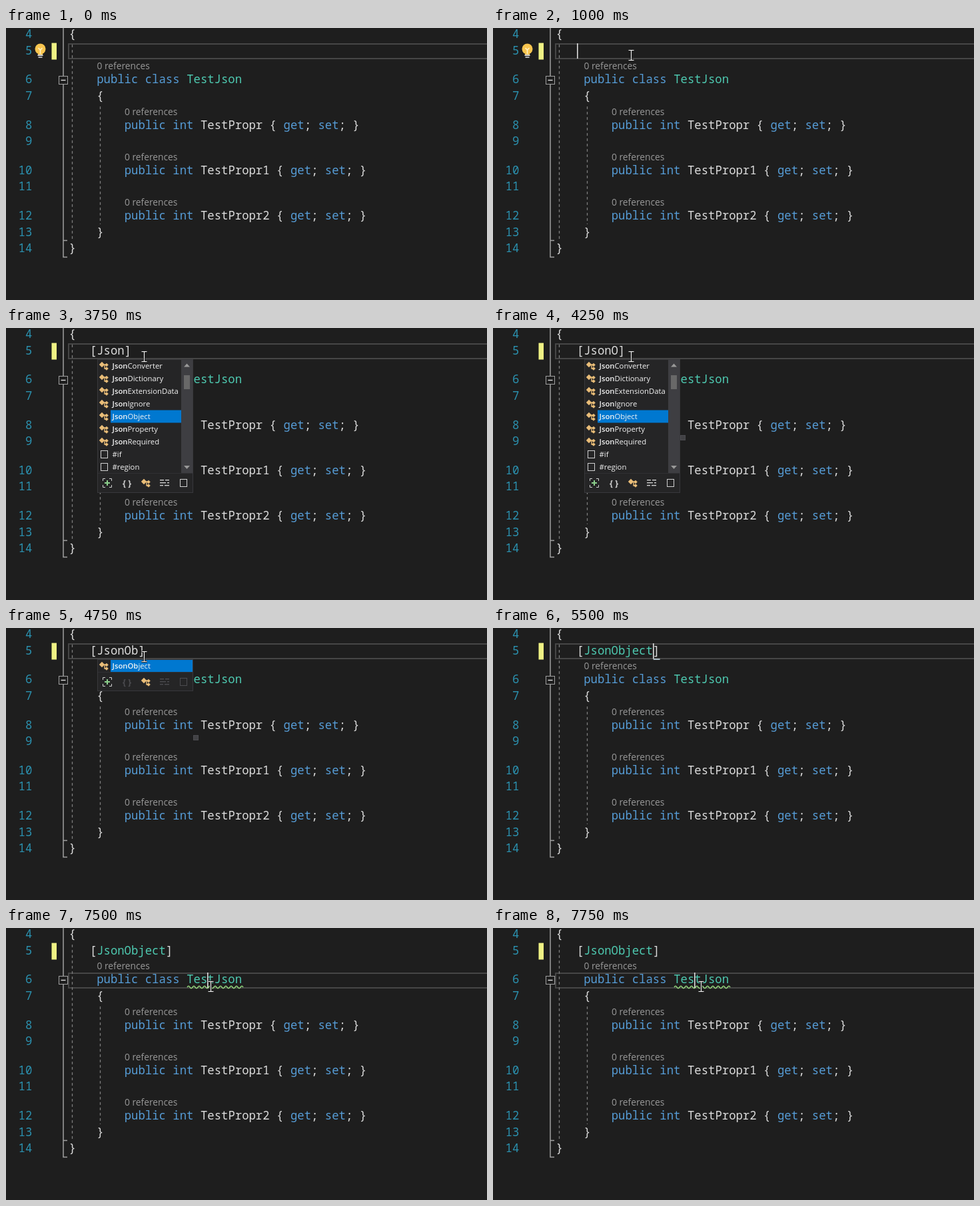
Animation, 722 px wide and 409 px high, one loop 8 s. Source, as an HTML page with a canvas:

```html
<!DOCTYPE html>
<html lang="en">
<head>
<meta charset="utf-8">
<title>Code editor</title>
<style>
  html, body { margin: 0; width: 100%; height: 100%; overflow: hidden; background: #1e1e1e; }
  canvas { display: block; }
</style>
</head>
<body>
<canvas id="stage" width="722" height="409"></canvas>
<script>
const ctx = document.getElementById('stage').getContext('2d');
const LOOP = 8000, STEP = 250, CHAR = 10.385, LEFT = 94.6;
const CODE = '500 17.3px "Noto Sans Mono", monospace';
const HINT = '13.8px "Open Sans", sans-serif';
const C = {
  bg: '#1e1e1e', plain: '#dcdcdc', keyword: '#569cd6', type: '#4ec9b0', number: '#2b91af',
  hint: '#999999', popup: '#252526', select: '#0078d0', icon: '#e9bd78', outline: '#a0a0a0'
};
const BASELINES = { 4: 15, 5: 40, 6: 83, 7: 108, 8: 152, 9: 176, 10: 220, 11: 244, 12: 288, 13: 313, 14: 337 };
const ITEMS = ['JsonConverter', 'JsonDictionary', 'JsonExtensionData', 'JsonIgnore', 'JsonObject',
  'JsonProperty', 'JsonRequired', '#if', '#region'];

// Each entry changes part of the editor state from its time on.
const EVENTS = [
  [0, { text: null, bulb: true, caret: null, mouse: null, line: 5, popup: null }],
  [250, { caret: 127, mouse: [268, 136] }],
  [500, { mouse: [240, 88] }],
  [750, { caret: null, mouse: [213, 48] }],
  [1000, { caret: 127, mouse: [207, 41] }],
  [1250, { mouse: [207, 43] }],
  [1500, { caret: null }],
  [2000, { text: '', bulb: false, caret: 137, match: true }],
  [2250, { caret: null }],
  [2500, { text: 'J', caret: 148 }],
  [2750, { text: 'Js', caret: 158 }],
  [3000, { text: 'Json', caret: 179 }],
  [3250, { caret: null, match: false }],
  [3750, { popup: 'full' }],
  [4000, { text: 'JsonO' }],
  [4250, { tip: true }],
  [4750, { text: 'JsonOb', popup: 'short' }],
  [5000, { text: 'JsonObje', mouse: null }],
  [5250, { text: 'JsonObject', popup: null, tip: false, caret: 241, match: true }],
  [5500, { resolved: true }],
  [5750, { caret: null, squiggle: true }],
  [6250, { mouse: [238, 58] }],
  [6500, { mouse: [290, 84] }],
  [6750, { mouse: [302, 88] }],
  [7250, { line: 6, match: false, caret: 303 }],
  [7500, { mouse: [307, 88] }],
  [7750, { mouse: [312, 88] }]
];

const stateAt = time => Object.assign({}, ...EVENTS.filter(e => e[0] <= time).map(e => e[1]));

function rect(x, y, w, h, color) {
  ctx.fillStyle = color;
  ctx.fillRect(x, y, w, h);
}

function path(points, color, width = 1, fill = false) {
  ctx.beginPath();
  points.forEach(([x, y]) => ctx.lineTo(x, y));
  if (fill) {
    ctx.closePath();
    ctx.fillStyle = color;
    ctx.fill();
  } else {
    ctx.strokeStyle = color;
    ctx.lineWidth = width;
    ctx.stroke();
  }
}

function box(x, y, w, h, color, width = 1) {
  ctx.strokeStyle = color;
  ctx.lineWidth = width;
  ctx.strokeRect(x, y, w, h);
}

function text(string, x, y, color, font) {
  ctx.font = font;
  ctx.fillStyle = color;
  ctx.fillText(string, x, y);
  return x + ctx.measureText(string).width;
}

// Takes pairs of text and colour and sets them on the character grid.
function code(line, column, ...tokens) {
  for (let i = 0; i < tokens.length; i += 2) {
    text(tokens[i], LEFT + column * CHAR, BASELINES[line], C[tokens[i + 1]], CODE);
    column += tokens[i].length;
  }
}

function drawGutter() {
  for (const line in BASELINES) text(line, 39.3 - line.length * CHAR, BASELINES[line], C.number, CODE);
  rect(68.5, 22.5, 7.5, 25, '#eff284');
  path([[86, 0], [86, 344.5], [92, 344.5]], C.outline, 1.5);
  path([[86, 319.5], [92, 319.5]], C.outline, 1.5);
  rect(79, 72, 14, 13, C.bg);
  box(79.5, 72.5, 13, 12, C.outline);
  path([[82.5, 78.5], [89.5, 78.5]], '#e0e0e0', 1.4);
  ctx.setLineDash([4, 4]);
  path([[99.5, 25], [99.5, 318]], '#7c7c7c', 1.3);
  path([[141.5, 118], [141.5, 295]], '#7c7c7c', 1.3);
  ctx.setLineDash([]);
}

function drawBulb() {
  ctx.beginPath();
  ctx.arc(51.5, 31.5, 8, 0, 7);
  ctx.fillStyle = '#f8c54f';
  ctx.fill();
  rect(48, 37, 7, 4, '#f8c54f');
  path([[48.5, 30], [51.5, 33], [54.5, 30]], '#fff1c4', 1.6);
  path([[51.5, 33], [51.5, 39]], '#fff1c4', 1.6);
  rect(47.5, 40, 8, 2, '#d0d0d0');
  rect(48.5, 43, 6, 2, '#b0b0b0');
}

function drawCode(s) {
  code(4, 0, '{', 'plain');
  if (s.text != null) code(5, 3, '[', 'plain', s.text, s.resolved ? 'type' : 'plain', ']', 'plain');
  code(6, 4, 'public class ', 'keyword', 'TestJson', 'type');
  code(7, 4, '{', 'plain');
  [[8, ''], [10, '1'], [12, '2']].forEach(([line, suffix]) => {
    code(line, 8, 'public int ', 'keyword', `TestPropr${suffix} { `, 'plain',
      'get', 'keyword', '; ', 'plain', 'set', 'keyword', '; }', 'plain');
    text('0 references', 178, BASELINES[line] - 21, C.hint, HINT);
  });
  text('0 references', 136.5, 62, C.hint, HINT);
  code(13, 4, '}', 'plain');
  code(14, 0, '}', 'plain');
  if (s.match) rect(LEFT + 0.6 + (4 + s.text.length) * CHAR, 46, 10, 2, '#a8b8c0');
  if (s.squiggle) {
    const wave = [];
    for (let x = 272; x <= 356; x++) wave.push([x, 89 - 1.8 * Math.sin((x - 272) * Math.PI / 4)]);
    path(wave, '#95db7d', 1.4);
  }
}

function classIcon(x, y) {
  const diamond = (dx, dy, r) =>
    path([[x + dx - r, y + dy], [x + dx, y + dy - r], [x + dx + r, y + dy], [x + dx, y + dy + r]], C.icon, 1, true);
  path([[x - 2, y - 2], [x + 4, y - 2]], C.icon, 1.4);
  path([[x + 1, y - 2], [x + 1, y + 4], [x + 4, y + 4]], C.icon, 1.4);
  diamond(-3, -2, 4.2);
  diamond(4, -1.5, 2.8);
  diamond(4, 4, 2.8);
}

function drawToolbar(y, dimmed) {
  const faint = dimmed ? '#4c4c50' : '#d0d0d0';
  for (const sx of [-1, 1]) for (const sy of [-1, 1])
    path([[152 + sx * 6.5, y + sy * 3], [152 + sx * 6.5, y + sy * 6.5], [152 + sx * 3, y + sy * 6.5]], '#d0d0d0');
  path([[148, y], [156, y]], '#8cd08c', 2);
  path([[152, y - 4], [152, y + 4]], '#8cd08c', 2);
  text('{ }', 175, y + 4.5, faint, 'bold 12.5px "Open Sans", sans-serif');
  classIcon(210, y);
  [[231, 6], [239, 6], [231, 9], [242, 3], [231, 5], [238, 7]].forEach(([x, w], i) =>
    rect(x, y - 5 + 4 * Math.floor(i / 2), w, 1.4, faint));
  box(261.5, y - 5.5, 10, 11, faint);
}

function drawItem(label, y, bold, selectWidth) {
  if (selectWidth) rect(157, y - 9.5, selectWidth, 19, C.select);
  if (label[0] === '#') box(142.5, y - 5.5, 10, 11, '#d0d0d0');
  else classIcon(147, y);
  const split = label[0] === '#' ? 0 : bold;
  const x = text(label.slice(0, split), 159.5, y + 4, '#f4f4f4', '600 11.3px "Open Sans", sans-serif');
  text(label.slice(split), x, y + 4, '#f4f4f4', '11.3px "Open Sans", sans-serif');
}

function drawPopup(s) {
  const full = s.popup === 'full', height = full ? 201 : 48;
  rect(137, 47, 144, height, C.popup);
  if (full) {
    ITEMS.forEach((label, i) => drawItem(label, 57 + i * 19, 4, label === 'JsonObject' && 106));
    rect(263, 47, 17, 171, '#3e3e42');
    rect(267, 71, 9, 21, '#686868');
    path([[267, 58.5], [271.5, 53.5], [276, 58.5]], '#999999', 1, true);
    path([[267, 207], [271.5, 212], [276, 207]], '#999999', 1, true);
  } else {
    drawItem('JsonObject', 57, s.text.length, 123);
  }
  path([[137, full ? 218.5 : 66.5], [281, full ? 218.5 : 66.5]], '#303033');
  drawToolbar(full ? 233 : 81, !full);
  box(137.5, 47.5, 143, height - 1, '#38383c');
}

function drawMouse([x, y]) {
  const strokes = [
    [[x - 3.5, y - 7.5], [x + 4.5, y - 7.5]],
    [[x + .5, y - 7.5], [x + .5, y + 7.5]],
    [[x - 3.5, y + 7.5], [x + 4.5, y + 7.5]]
  ];
  strokes.forEach(p => path(p, '#101010', 3));
  strokes.forEach(p => path(p, '#f4f4f4', 1.2));
}

function draw(time) {
  const s = stateAt(Math.floor(time / STEP) * STEP);
  const top = s.line === 5 ? 23 : 67;
  rect(0, 0, 722, 409, C.bg);
  box(94, top + 1, 640, 22, '#464646', 2);
  drawGutter();
  if (s.bulb) drawBulb();
  drawCode(s);
  if (s.caret) rect(s.caret - 1, top, 1.6, 23, '#dcdcdc');
  if (s.popup) drawPopup(s);
  if (s.tip) {
    rect(281, 161, 8, 8, '#424245');
    box(281.5, 161.5, 7, 7, '#4c4c50');
  }
  if (s.mouse) drawMouse(s.mouse);
}

function tick() {
  draw(performance.now() % LOOP);
  requestAnimationFrame(tick);
}
tick();
</script>
</body>
</html>
```
